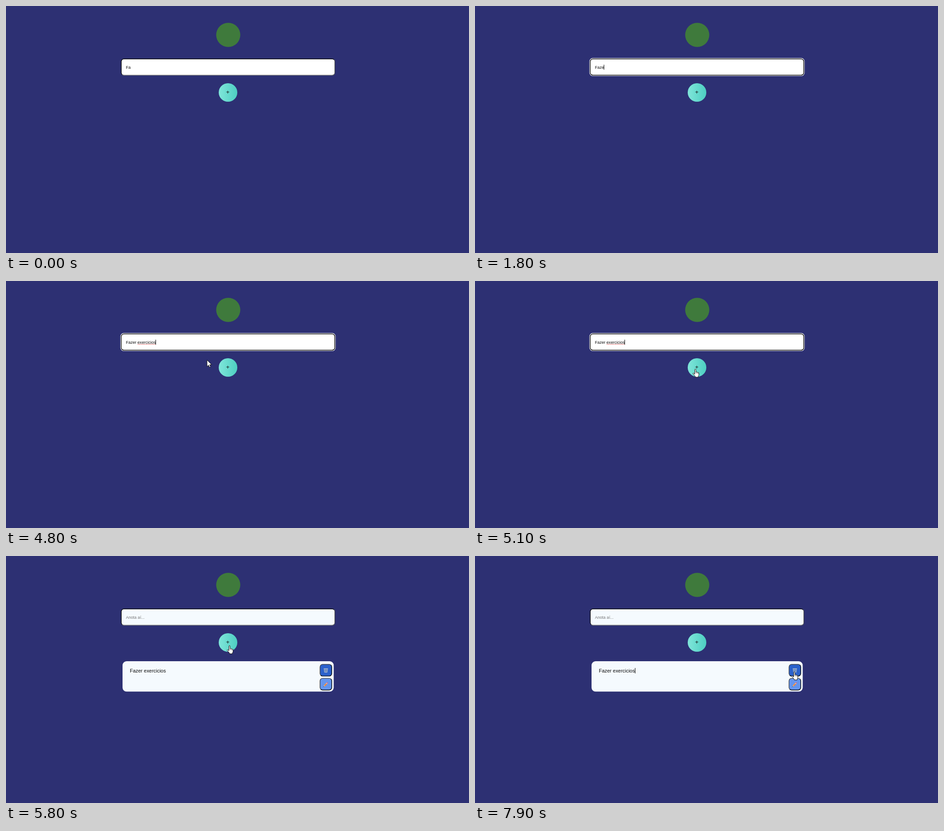
These frames come from a looping animation (1025 px wide and 547 px high, 8000 ms). An HTML page with a canvas:

```html
<!DOCTYPE html>
<html lang="pt">
<head>
<meta charset="utf-8">
<title>Lista de tarefas</title>
<style>
html, body { margin: 0; width: 100%; height: 100%; overflow: hidden; background: #2d3073; }
canvas { display: block; }
</style>
</head>
<body>
<canvas id="stage" width="1025" height="547"></canvas>
<script>
const ctx = document.getElementById('stage').getContext('2d');
const LOOP = 8000, STEP = 100;
const FONT = '"Liberation Sans", Arial, sans-serif';
const TASK = 'Fazer exercicios';
const PALE = '#f5fafe';

// Moments at which each character after "Fa" is typed.
const KEYS = [1500, 1800, 1900, 2100, 2200, 2400, 2600, 2700, 2900, 3100, 3200, 3400, 3600, 3800];
const FOCUS = 900, SPELL = 4600, BLUR = 5200, ADDED = 5800;

// Pointer: time, shape, x, y. Positions glide between keys of a visible pointer.
const POINTER = [
  [0], [100, arrow, 57, 37], [300, arrow, 168, 122], [500, arrow, 286, 175], [600],
  [4700, arrow, 428, 162], [4800, arrow, 445, 175], [4900, arrow, 461, 186],
  [5000, hand, 476, 192], [5200, hand, 488, 197], [5500, hand, 489, 198], [6300, hand, 489, 198],
  [6400, arrow, 470, 220], [6500, arrow, 425, 237], [6600],
  [7700, hand, 697, 252], [7900, hand, 701, 256], [LOOP, hand, 701, 256]
];

const within = (t, a, b) => t >= a && t < b;

function box(x, y, w, h, r, color) {
  ctx.fillStyle = color;
  ctx.beginPath();
  ctx.roundRect(x, y, w, h, r);
  ctx.fill();
}

function disc(x, y, r, color) {
  ctx.fillStyle = color;
  ctx.beginPath();
  ctx.arc(x, y, r, 0, 7);
  ctx.fill();
}

function text(str, x, y, size, color) {
  ctx.font = size + 'px ' + FONT;
  ctx.fillStyle = color;
  ctx.fillText(str, x, y);
  return x + ctx.measureText(str).width;
}

function line(color, width, ...p) {
  ctx.strokeStyle = color;
  ctx.lineWidth = width;
  ctx.beginPath();
  for (let i = 0; i < p.length; i += 2) ctx.lineTo(p[i], p[i + 1]);
  ctx.stroke();
}

// Rounded box whose top-left and bottom-right borders differ.
function bevel(x, y, w, h, r, light, shade, fill) {
  const m = h / 2, b = 1.4;
  box(x, y, w, h, r, light);
  ctx.save();
  ctx.beginPath();
  ctx.moveTo(x, y + h);
  ctx.lineTo(x + m, y + m);
  ctx.lineTo(x + w - m, y + m);
  ctx.lineTo(x + w, y);
  ctx.lineTo(x + w, y + h);
  ctx.clip();
  box(x, y, w, h, r, shade);
  ctx.restore();
  box(x + b, y + b, w - 2 * b, h - 2 * b, r - b, fill);
}

function caret(x, y, h) {
  ctx.fillStyle = '#000';
  ctx.fillRect(Math.floor(x), y, 1, h);
}

function shape(x, y, d) {
  const path = new Path2D(d);
  ctx.save();
  ctx.translate(x, y);
  ctx.lineJoin = 'round';
  ctx.lineWidth = 1;
  ctx.strokeStyle = '#111';
  ctx.fillStyle = '#fff';
  ctx.fill(path);
  ctx.stroke(path);
  ctx.restore();
}

function arrow(x, y) {
  shape(x, y, 'M0 0V14.5L3.4 11.4L5.6 16.2L8 15.2L5.8 10.4H10.3Z');
}

function hand(x, y) {
  shape(x, y, 'M4.5 12V2Q4.6 .5 5.8 .5T7.1 2V7Q8.9 5.9 9.7 7.6Q11.3 6.8 12 8.4' +
    'Q13.6 8 13.7 9.8V13Q13.5 15.6 12.2 16.6V18.5H5.8V17L1 11.5Q-.2 9.8 1.3 9.3Q2.4 9.1 4.5 12Z');
  line('#111', .7, x + 7.2, y + 7, x + 7.2, y + 10);
  line('#111', .7, x + 9.7, y + 8, x + 9.7, y + 10.5);
  line('#111', .7, x + 12, y + 9, x + 12, y + 11);
}

function drawInput(t) {
  const focused = within(t, FOCUS, BLUR), added = t >= ADDED;
  if (focused) box(253.3, 115.3, 476.4, 39.8, 7.5, '#fff');
  bevel(254.5, 116.5, 474, 37.5, 6.5, '#0a0a0a', focused ? '#0a0a0a' : '#767676', added ? PALE : '#fff');
  if (added) {
    text('Anota aí...', 265.4, 138.7, 9.07, '#757575');
    return;
  }
  const typed = TASK.slice(0, 2 + KEYS.filter(k => k <= t).length);
  const end = text(typed, 265.4, 138.7, 9.07, '#111');
  if (!focused) return;
  if (t >= SPELL) {
    ctx.setLineDash([1.5, 1]);
    line('#e23b3b', 1, 291.5, 140.3, end, 140.3);
    ctx.setLineDash([]);
  }
  if (!within(t, 1300, 1500) && !within(t, 4300, 4800)) caret(end, 130, 11);
}

function drawAddButton() {
  const g = ctx.createLinearGradient(471, 0, 512, 0);
  g.addColorStop(0, '#80e6da');
  g.addColorStop(1, '#4dcec1');
  disc(491.5, 191.5, 20.6, g);
  text('+', 487, 195.4, 13.5, '#111');
}

function drawBin() {
  const c = '#b9c3cc';
  line(c, 1.2, 703.5, 249.5, 712.7, 249.5);
  line(c, 1, 704.2, 249.5, 705.3, 257.7, 710.9, 257.7, 712, 249.5);
  for (const x of [706.3, 708.1, 709.9]) line(c, .8, x, 250, x, 257.5);
  for (const y of [252.2, 254.8]) line('#8d9aa8', .7, 704.7, y, 711.5, y);
}

function drawPencil() {
  line('#f4d3a4', 2, 703.6, 288.6, 705.6, 286.6);
  line('#f58233', 3, 705, 287.2, 710, 282.2);
  line('#ffab58', 1, 704.6, 286.4, 709.4, 281.6);
  line('#c9d3d8', 3, 709.5, 282.7, 710.6, 281.6);
  line('#ef6577', 3, 710.4, 281.8, 711.8, 280.4);
  disc(703.6, 288.7, .7, '#4a3b38');
}

function drawCard(t) {
  box(258, 233, 467.5, 67.3, 9, PALE);
  text(TASK, 274.3, 257.6, 10.95, '#0a0a0a');
  if (within(t, 7000, 7500) || t >= 7900) caret(354, 248, 12);
  bevel(694.5, 239.3, 27.3, 27.3, 6.5, '#3f444c', '#05070c', '#2b61cb');
  bevel(694.5, 270.2, 27.3, 27.3, 6.5, '#3f444c', '#05070c', '#6495ed');
  drawBin();
  drawPencil();
}

function drawPointer(t) {
  const i = POINTER.findLastIndex(k => k[0] <= t);
  const [start, draw, x, y] = POINTER[i];
  if (!draw) return;
  const [end, next, nx, ny] = POINTER[i + 1];
  const p = next ? (t - start) / (end - start) : 0;
  draw(x + (next ? (nx - x) * p : 0), y + (next ? (ny - y) * p : 0));
}

function frame(now) {
  const t = Math.floor(now % LOOP / STEP) * STEP;
  ctx.fillStyle = '#2d3073';
  ctx.fillRect(0, 0, 1025, 547);
  disc(492, 64, 26.7, '#3f7a3c');
  drawInput(t);
  drawAddButton();
  if (t >= ADDED) drawCard(t);
  drawPointer(t);
}

const origin = performance.now();
(function tick() {
  frame(performance.now() - origin);
  requestAnimationFrame(tick);
})();
</script>
</body>
</html>
```
